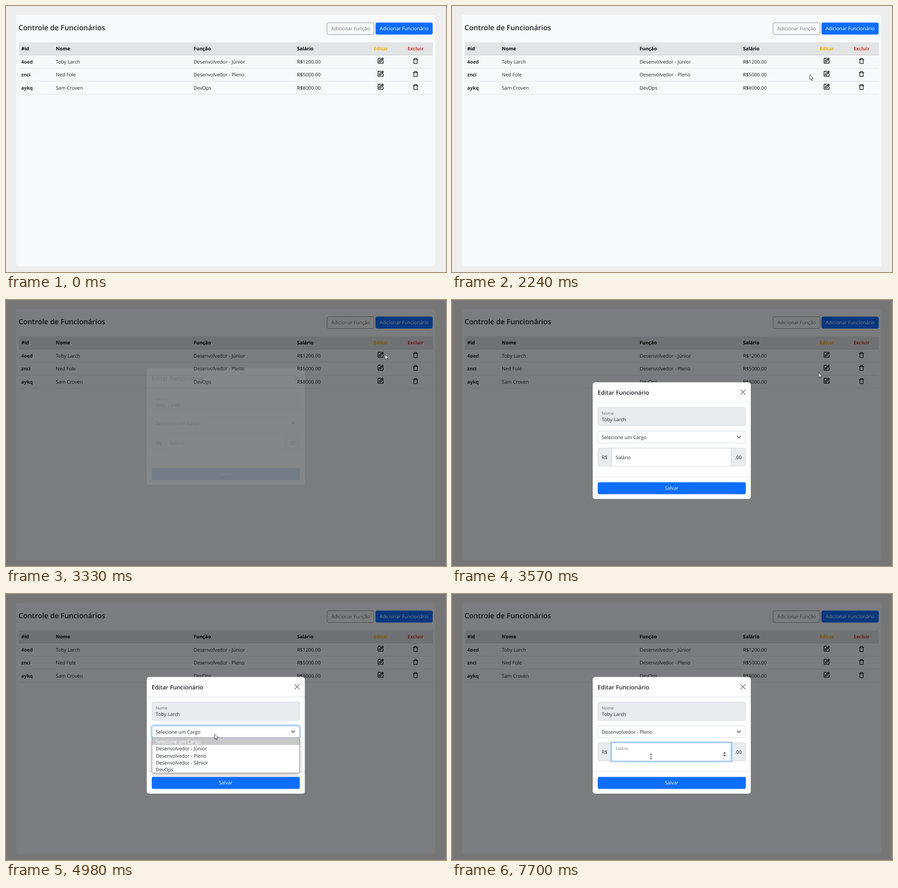
An HTML page that plays this animation: 963 by 582 pixels, repeating every 8 s.

```html
<!DOCTYPE html>
<html lang="pt-BR">
<head>
<meta charset="utf-8">
<title>Controle de Funcionários</title>
<style>
html, body { margin: 0; width: 100%; height: 100%; overflow: hidden; background: #eee; }
svg { display: block; width: 100%; height: 100%; }
text { font: 400 10.6px "Open Sans", "Noto Sans", sans-serif; fill: #212529; text-rendering: geometricPrecision; }
.b { font-weight: 700; font-size: 10.45px; }
.head .b, .cur { fill: #000; }
.head .edit { fill: #f9ae06; }
.head .del { fill: #d43a35; }
.h1 { font-weight: 600; font-size: 15.7px; }
.h2 { font-weight: 600; font-size: 12.75px; }
.btn { font-size: 10.52px; }
.mid { text-anchor: middle; }
.small { font-size: 9.05px; fill-opacity: .65; }
.w { fill: #fff; }
.field { stroke: #ced4da; }
.ring rect:first-child { fill: none; stroke: #0d6efd; stroke-opacity: .25; stroke-width: 2.8; }
.ring rect:last-child { fill: none; stroke: #86b7fe; }

/* one 8 s clock for everything; 1% = 80 ms */
.a { animation: 8s linear infinite both; }
.step { animation-timing-function: step-end; }
.ease { animation-timing-function: ease-in-out; }

.shade { animation-name: shade; }
@keyframes shade { 0%, 37.375% { opacity: 0 } 39.25%, 100% { opacity: .5 } }

.modal { animation-name: drop; }
@keyframes drop {
  0%, 41.4875% { transform: translateY(-34.65px); animation-timing-function: ease-out }
  45.2375%, 100% { transform: none }
}
.fade { animation-name: fade; }
@keyframes fade { 0%, 41.4875% { opacity: 0 } 43.3625%, 100% { opacity: 1 } }

.selring { animation-name: selring; }
@keyframes selring { 0%, 59.25% { opacity: 0 } 61.125%, 90.625% { opacity: 1 } 92.5%, 100% { opacity: 0 } }
.inring { animation-name: inring; }
@keyframes inring { 0%, 90.625% { opacity: 0 } 92.5%, 100% { opacity: 1 } }

.list { animation-name: list; }
@keyframes list {
  0%, 59.5% { opacity: 0 }
  61.25% { opacity: 1 }
  76.375% { opacity: 1; animation-timing-function: step-start }
  76.5%, 100% { opacity: 0 }
}
.hot0 { animation-name: hot0; }
@keyframes hot0 { 0% { opacity: 1 } 69.25%, 100% { opacity: 0 } }
.hot1 { animation-name: hot1; }
@keyframes hot1 { 0% { opacity: 0 } 69.25% { opacity: 1 } 70.875%, 100% { opacity: 0 } }
.hot2 { animation-name: hot2; }
@keyframes hot2 { 0% { opacity: 0 } 70.875%, 100% { opacity: 1 } }

.before { animation-name: before; }
@keyframes before { 0% { opacity: 1 } 76.375%, 100% { opacity: 0 } }
.after { animation-name: after; }
@keyframes after { 0% { opacity: 0 } 76.375%, 100% { opacity: 1 } }

.label { font-size: 10.4px; animation-name: label; }
@keyframes label {
  0%, 90.625% { transform: translate(358px, 350px); fill-opacity: 1 }
  91.875%, 100% { transform: translate(358px, 341.5px) scale(.85); fill-opacity: .65 }
}
.spin { animation-name: spin; }
@keyframes spin {
  0% { opacity: 0; transform: none }
  78% { opacity: 1; transform: none }
  90.625%, 100% { opacity: 1; transform: translateY(5px) }
}
.caret { animation-name: caret; }
@keyframes caret { 0% { opacity: 0 } 90.625% { opacity: 1 } 96.25%, 100% { opacity: 0 } }

.arrow { animation-name: arrow; }
@keyframes arrow {
  0%, 9% { transform: translate(900px, 590px) }
  9.125% { transform: translate(900px, 580px) }
  11.25% { transform: translate(868px, 500px) }
  13.25% { transform: translate(815px, 375px) }
  15.25% { transform: translate(745px, 275px) }
  16.75% { transform: translate(668px, 205px) }
  18% { transform: translate(587.5px, 156px) }
  19% { transform: translate(526px, 138px) }
  19.75%, 21.75% { transform: translate(495.5px, 133.5px) }
  23.75% { transform: translate(540px, 148px) }
  26% { transform: translate(660px, 154px) }
  28.125% { transform: translate(790px, 150px) }
  29.5% { transform: translate(852px, 140px) }
  30.625% { transform: translate(842px, 126px) }
  31.625% { transform: translate(827px, 120px) }
  32.625%, 43% { transform: translate(829.5px, 119px) }
  44% { transform: translate(817px, 140px) }
  44.625% { transform: translate(802.5px, 158px) }
  45.125%, 46.375% { transform: translate(788px, 172px) }
  48.125% { transform: translate(740px, 205px) }
  50.625% { transform: translate(620px, 262px) }
  53.125% { transform: translate(520px, 295px) }
  56.25% { transform: translate(461px, 305px) }
  56.75%, 65.75% { transform: translate(456.5px, 306.5px) }
  68.75% { transform: translate(446px, 326px) }
  71.25% { transform: translate(430px, 350px) }
  72.875%, 100% { transform: translate(426px, 356px) }
}
.beam { animation-name: beam; }
@keyframes beam {
  0%, 89.375% { transform: translate(427px, 357px) }
  90.5%, 100% { transform: translate(435.5px, 355.5px) }
}
.beamon { animation-name: beamon; }
@keyframes beamon { 0% { opacity: 0 } 80.875%, 100% { opacity: 1 } }
</style>
</head>
<body>
<svg viewBox="0 0 963 582" xmlns="http://www.w3.org/2000/svg">
  <defs>
    <g id="tools" fill-rule="evenodd">
      <path transform="translate(811.6 111.5) scale(.693)" d="M7 17l4.4 0 9.6-9.5a2 2 0 0 0 0-2.9l-1.5-1.5a2 2 0 0 0-2.9 0L7 12.6zM18 4.5l1.6 1.5-1.6 1.6-1.6-1.6zM9 13.4l6-6 1.6 1.6-6 6H9zM5 21h14a2 2 0 0 0 2-2v-8.7l-2 2V19H5V5h6.8l2-2H5a2 2 0 0 0-2 2v14a2 2 0 0 0 2 2z"/>
      <path transform="translate(888.9 112.8) scale(.62)" d="M5 20a2 2 0 0 0 2 2h10a2 2 0 0 0 2-2V8h2V6h-4V4a2 2 0 0 0-2-2H9a2 2 0 0 0-2 2v2H3v2h2zM9 4h6v2H9zM7 8h10v12H7z"/>
      <rect x="28" y="135.5" width="906" height="1" fill="#dee2e6"/>
    </g>
  </defs>

  <rect width="963" height="582" fill="#eee"/>
  <rect x="22" y="19.5" width="917.5" height="549.5" rx="4.5" fill="#f8f9fb"/>
  <text class="h1" x="27.5" y="52.5">Controle de Funcionários</text>
  <rect x="702.6" y="36.6" width="102.9" height="25.8" rx="4" fill="none" stroke="#6c757d" stroke-width=".8"/>
  <text class="btn mid" x="754.3" y="53.4" style="fill:#6c757d">Adicionar Função</text>
  <rect x="808.8" y="36.2" width="125" height="26.4" rx="4" fill="#0d6efd"/>
  <text class="btn mid w" x="871.3" y="53.4">Adicionar Funcionário</text>

  <g class="head">
    <rect x="28" y="79.5" width="906" height="28" fill="#e2e3e5"/>
    <rect x="28" y="107" width="906" height="1" fill="#cbccce"/>
    <text class="b" x="33.5" y="97.3">#id</text>
    <text class="b" x="109" y="97.3">Nome</text>
    <text class="b" x="410.8" y="97.3">Função</text>
    <text class="b" x="637" y="97.3">Salário</text>
    <text class="b mid edit" x="820.4" y="97.3">Editar</text>
    <text class="b mid del" x="896.4" y="97.3">Excluir</text>
  </g>
  <g>
    <text class="b" x="33.3" y="125.8">4oed</text>
    <text x="109" y="125.8">Toby Larch</text>
    <text x="410.8" y="125.8">Desenvolvedor - Júnior</text>
    <text x="637" y="125.8"><tspan class="cur">R$</tspan>1200.00</text>
    <use href="#tools"/>
  </g>
  <g transform="translate(0 28.5)">
    <text class="b" x="33.3" y="125.8">znci</text>
    <text x="109" y="125.8">Ned Fole</text>
    <text x="410.8" y="125.8">Desenvolvedor - Pleno</text>
    <text x="637" y="125.8"><tspan class="cur">R$</tspan>5000.00</text>
    <use href="#tools"/>
  </g>
  <g transform="translate(0 57)">
    <text class="b" x="33.3" y="125.8">aykq</text>
    <text x="109" y="125.8">Sam Croven</text>
    <text x="410.8" y="125.8">DevOps</text>
    <text x="637" y="125.8"><tspan class="cur">R$</tspan>8000.00</text>
    <use href="#tools"/>
  </g>

  <rect class="a shade" width="963" height="582"/>

  <g class="a fade"><g class="a modal">
    <rect x="308" y="181.5" width="346" height="255.5" rx="5.5" fill="#fff"/>
    <text class="h2" x="318.8" y="208.2">Editar Funcionário</text>
    <path d="M631.8 197.8l10.4 10.4M642.2 197.8l-10.4 10.4" stroke="#707070" stroke-width="1.4" stroke-linecap="round"/>
    <path d="M308 224.5h346M308 388.5h346" stroke="#dee2e6"/>

    <rect class="field" x="319.5" y="236.5" width="323" height="40" rx="4" fill="#e9ecef"/>
    <text class="small" x="327.8" y="252.4">Nome</text>
    <text x="327.8" y="266.6">Toby Larch</text>

    <rect class="field" x="319.5" y="288.5" width="323" height="26" rx="4" fill="#fff"/>
    <g class="a ease ring selring">
      <rect x="317.6" y="286.6" width="326.8" height="29.8" rx="5.5"/>
      <rect x="319.5" y="288.5" width="323" height="26" rx="4"/>
    </g>
    <text class="a step before" x="327.8" y="305.2">Selecione um Cargo</text>
    <text class="a step after" x="327.8" y="305.2">Desenvolvedor - Pleno</text>
    <path d="M624.6 299.3l3.5 3.5 3.5-3.5" fill="none" stroke="#343a40" stroke-width="1.4" stroke-linecap="round" stroke-linejoin="round"/>

    <rect class="field" x="319.5" y="325.5" width="323" height="40" rx="4" fill="#e9ecef"/>
    <rect class="field" x="349.5" y="325.5" width="261" height="40" fill="#fff"/>
    <text x="327.8" y="349.8">R$</text>
    <text x="619.2" y="349.8">.00</text>
    <g class="a ease ring inring">
      <rect x="347.6" y="323.6" width="264.8" height="43.8" rx="2"/>
      <rect x="349.5" y="325.5" width="261" height="40"/>
    </g>
    <text class="a ease label">Salário</text>
    <g class="a step spin">
      <rect x="591.5" y="339.5" width="10" height="12" fill="#f4f4f4"/>
      <path d="M593.4 344.2l3-3.4 3 3.4zM593.4 347l3 3.4 3-3.4z" fill="#404040"/>
    </g>
    <rect class="a step caret" x="358" y="343" width="1" height="15" fill="#212529"/>

    <rect x="319" y="400" width="324" height="26.5" rx="4" fill="#0d6efd"/>
    <text class="btn mid w" x="480.8" y="417">Salvar</text>
  </g></g>

  <g class="a list">
    <path d="M319.5 315h323v73a3.5 3.5 0 0 1-3.5 3.5h-316a3.5 3.5 0 0 1-3.5-3.5z" fill="#fff" stroke="#8a8a8a" style="filter:drop-shadow(0 3px 5px rgba(0,0,0,.28))"/>
    <text x="327.8" y="326.9" style="fill:#999">Selecione um Cargo</text>
    <text x="327.8" y="342.2">Desenvolvedor - Júnior</text>
    <text x="327.8" y="357.5">Desenvolvedor - Pleno</text>
    <text x="327.8" y="372.8">Desenvolvedor - Sênior</text>
    <text x="327.8" y="388.1">DevOps</text>
    <g class="a step hot0">
      <rect x="320" y="315" width="322" height="15.3" fill="#c8c8c8"/>
      <text class="w" x="327.8" y="326.9">Selecione um Cargo</text>
    </g>
    <g class="a step hot1">
      <rect x="320" y="330.3" width="322" height="15.3" fill="#1967d2"/>
      <text class="w" x="327.8" y="342.2">Desenvolvedor - Júnior</text>
    </g>
    <g class="a step hot2">
      <rect x="320" y="345.6" width="322" height="15.3" fill="#1967d2"/>
      <text class="w" x="327.8" y="357.5">Desenvolvedor - Pleno</text>
    </g>
  </g>

  <g class="a step before">
    <path class="a arrow" d="M0 0V11.2L2.6 8.8 4.2 12.6 5.9 11.9 4.3 8.1H7.8Z" fill="#fff" stroke="#111" stroke-width=".8"/>
  </g>
  <g class="a step beamon">
    <path class="a beam" d="M-2.5 -5.5h2l.5 .5 .5-.5h2M-2.5 5.5h2l.5-.5 .5 .5h2M0 -5V5" fill="none" stroke="#222"/>
  </g>
</svg>
</body>
</html>
```
